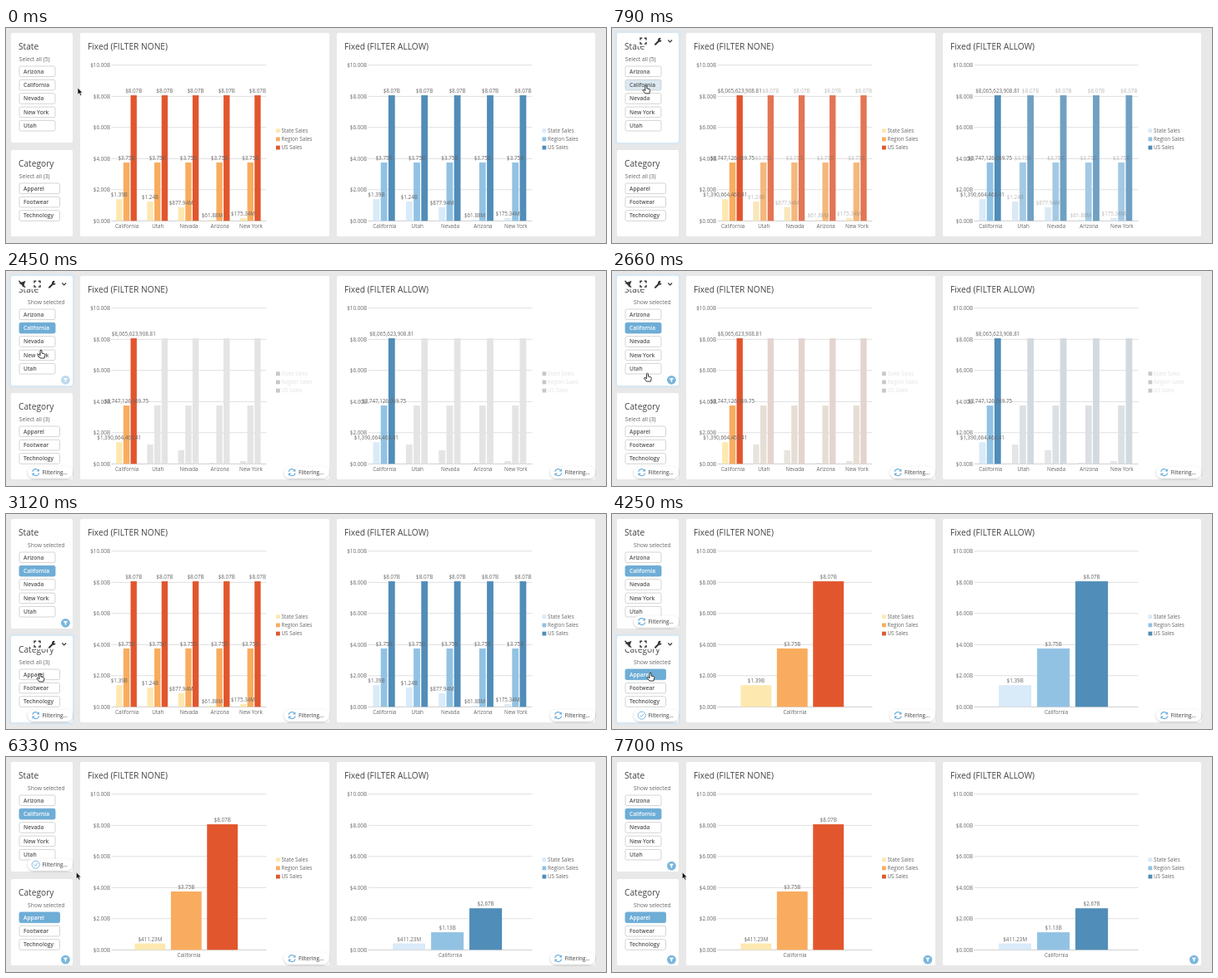
An HTML page for the animation above (8 s loop, 720x259 px).

```html
<!DOCTYPE html>
<html lang="en">
<head>
<meta charset="utf-8">
<title>Dashboard filters</title>
<style>
  html, body { margin: 0; width: 100%; height: 100%; overflow: hidden; background: #e8e8e8; }
  svg { display: block; width: 720px; height: 259px; font: 6.3px "Open Sans", "Noto Sans", sans-serif; fill: #666; }
  .title { font-size: 10.2px; fill: #444; }
  .link { font-size: 6.7px; }
  .button { font-size: 6.65px; font-weight: 600; fill: #555; }
  .pill { font-weight: 600; fill: #666; }
  .icon { fill: none; stroke: #333; stroke-width: 1.4; }
  .blue { fill: none; stroke: #6eb1dc; stroke-width: 1.2; }
</style>
</head>
<body>
<svg id="stage" viewBox="0 0 720 259" xmlns="http://www.w3.org/2000/svg">
  <defs>
    <filter id="shadow" x="-20%" y="-40%" width="140%" height="200%">
      <feDropShadow dx="0" dy="0.8" stdDeviation="1.1" flood-opacity="0.28"/>
    </filter>
  </defs>
  <g id="scene"></g>
</svg>
<script>
const LOOP = 8000;
const scene = document.getElementById('scene');

const clamp = v => Math.max(0, Math.min(1, v));
const mix = (a, b, p) => a + (b - a) * p;
const smooth = p => p * p * (3 - 2 * p);
const ramp = (t, from, to) => smooth(clamp((t - from) / (to - from)));
const between = (t, from, to) => t >= from && t < to;

// Eased position along [time, x, y] stops
function along(stops, t) {
  const i = stops.findIndex(s => s[0] > t);
  if (i < 0) return stops[stops.length - 1].slice(1);
  if (i === 0) return stops[0].slice(1);
  const a = stops[i - 1], b = stops[i], p = ramp(t, a[0], b[0]);
  return [mix(a[1], b[1], p), mix(a[2], b[2], p)];
}

function mixColor(a, b, p) {
  const part = (c, i) => parseInt(c.slice(1 + 2 * i, 3 + 2 * i), 16);
  return `rgb(${[0, 1, 2].map(i => Math.round(mix(part(a, i), part(b, i), p)))})`;
}

const rect = (x, y, w, h, fill, extra = '') =>
  `<rect x="${x}" y="${y}" width="${w}" height="${h}" fill="${fill}" ${extra}/>`;
const text = (x, y, s, extra = '') => `<text x="${x}" y="${y}" ${extra}>${s}</text>`;
const group = (inner, opacity) => opacity > 0 ? `<g opacity="${opacity}">${inner}</g>` : '';
const path = (d, extra) => `<path d="${d}" ${extra}/>`;

const STATES = ['California', 'Utah', 'Nevada', 'Arizona', 'New York'];
const STATE_SALES = [1.3907, 1.24, 0.87794, 0.06188, 0.17534];
const EXACT = ['$1,390,664,463.41', '$3,747,126,069.75', '$8,065,623,908.81'];
const SERIES = ['State Sales', 'Region Sales', 'US Sales'];
const BASE = 232.3, UNIT = 18.75;

const CHARTS = [
  { x: 89, width: 299, title: 'Fixed (FILTER NONE)', left: 126.6, right: 312.5, legend: 324,
    colors: ['#fde8b0', '#f9ac5f', '#e2562d'], final: [0.41123, 3.7471, 8.0656] },
  { x: 397, width: 310, title: 'Fixed (FILTER ALLOW)', left: 434.6, right: 631.6, legend: 643.5,
    colors: ['#d9eaf8', '#92c2e3', '#508db8'], final: [0.41123, 1.13, 2.67] }
];

const money = v => v < 1 ? `$${(v * 1000).toFixed(2)}M` : `$${v.toFixed(2)}B`;

function drawChart(c, t) {
  const focus = ramp(t, 560, 1330) * (1 - ramp(t, 2560, 3040));
  const faded = ramp(t, 910, 1330) * (1 - ramp(t, 2700, 3090));
  const widen = ramp(t, 3840, 4190);
  const settle = ramp(t, 5450, 5790);
  const exact = between(t, 640, 2800);
  const span = c.right - c.left;
  let bars = '', labels = '';

  let out = rect(c.x, 6, c.width, 245, '#fff', 'rx="2"') + text(c.x + 9, 26, c.title, 'class="title"');
  for (let v = 0; v <= 10; v += 2) {
    const y = BASE - v * UNIT;
    out += rect(c.left, y - 0.4, span, 0.8, v ? '#d8d8d8' : '#c4c4c4');
    labels += text(c.left - 1.6, y + 2.3, `$${v.toFixed(2)}B`, 'text-anchor="end"');
  }

  STATES.forEach((name, i) => {
    const main = i === 0;
    const shown = main ? 1 : 1 - widen;
    if (!shown) return;
    const slot = main ? mix(span / 5, span, widen) : span / 5;
    const center = c.left + (main ? slot / 2 : slot * (i + 0.5));
    const pitch = slot * 0.7 / 3;
    let groupBars = '', groupLabels = '';
    [STATE_SALES[i], 3.7471, 8.0656].forEach((start, k) => {
      const value = main ? mix(start, c.final[k], settle) : start;
      const x = center + pitch * (k - 1.5), w = pitch * 0.85, top = BASE - value * UNIT;
      const fill = main ? c.colors[k] : mixColor(c.colors[k], '#e4e4e4', focus);
      groupBars += rect(x, top, w, BASE - top, fill);
      const label = main && exact ? EXACT[k] : money(settle && main ? c.final[k] : start);
      groupLabels += group(text(x + w / 2, top - 3, label, 'text-anchor="middle"'),
        main ? 1 : 1 - clamp(focus * 2.5));
    });
    bars += group(groupBars, shown);
    labels += group(groupLabels + text(center, 241.2, name, 'text-anchor="middle"'), shown);
  });

  SERIES.forEach((name, k) => {
    const y = 123.7 + k * 10.2;
    labels += rect(c.legend, y - 2.4, 4.8, 4.8, mixColor(c.colors[k], '#c8c8c8', faded)) +
      text(c.legend + 6.5, y + 2.3, name, `fill="${mixColor('#666666', '#e2e2e2', faded)}"`);
  });
  return out + bars + labels;
}

function drawToolbar(cy, full) {
  const left = full ? 12 : 30;
  let out = rect(left, cy - 7.5, 78 - left, 13.5, '#fff');
  if (full) {
    out += path(`M15.5 ${cy - 1} L23.5 ${cy - 4} L20.5 ${cy + 4} L19 ${cy + 1} Z`, 'fill="#333"') +
      path(`M15.5 ${cy - 4} L23 ${cy + 4}`, 'class="icon"');
  }
  const corner = (sx, sy) =>
    path(`M${37.5 + 1.3 * sx} ${cy + 3.4 * sy} h${2.2 * sx} v${-2.2 * sy}`, 'class="icon"');
  out += corner(1, 1) + corner(1, -1) + corner(-1, 1) + corner(-1, -1);
  out += path(`M52 ${cy + 4} L56 ${cy}`, 'class="icon" style="stroke-width:2" stroke-linecap="round"');
  out += path(`M58.8 ${cy - 3.2} A2.3 2.3 0 1 0 59.6 ${cy - 0.8} L57.2 ${cy - 1.2} Z`, 'fill="#333"');
  return out + path(`M67.3 ${cy - 1.2} l2.4 2.4 l2.4 -2.4`, 'class="icon" style="stroke-width:1.1"');
}

function drawPanel(p, t) {
  const hovered = between(t, ...p.hover);
  const chosen = t >= p.click;
  let out = hovered ? rect(3.5, p.y - 2.5, 79, p.height + 5, '#d9e7f1', 'rx="3"') : '';
  out += rect(6, p.y, 74, p.height, '#fff', 'rx="2"') + text(15, p.y + 20, p.title, 'class="title"');
  out += chosen
    ? text(70.5, p.y + 34, 'Show selected', 'class="link" text-anchor="end"')
    : text(15.8, p.y + 34, `Select all (${p.items.length})`, 'class="link"');
  p.items.forEach((name, i) => {
    const y = p.y + 40 + i * 16.35;
    const on = name === p.pick && chosen;
    const warm = name === p.pick && between(t, p.warm, p.click);
    const fill = on ? '#6eadd6' : warm ? '#dbe8f1' : '#fff';
    out += rect(16, y, p.buttonWidth, 12.6, fill, `rx="1.8" stroke="${on ? '#6eadd6' : '#d0d0d0'}" stroke-width="0.9"`);
    out += text(21, y + 8.7, name, `class="button" ${on ? 'style="fill:#fff"' : ''}`);
  });
  return out + (hovered ? drawToolbar(p.y + 9.7, chosen) : '');
}

const PANELS = [
  { y: 6, height: 132, title: 'State', items: ['Arizona', 'California', 'Nevada', 'New York', 'Utah'],
    buttonWidth: 43, pick: 'California', hover: [260, 2830], warm: 560, click: 1910 },
  { y: 147, height: 104, title: 'Category', items: ['Apparel', 'Footwear', 'Technology'],
    buttonWidth: 48.5, pick: 'Apparel', hover: [2830, 4980], warm: 3700, click: 3740 }
];

function drawPill(x, y, done) {
  const cx = x + 9.7;
  let out = rect(x, y - 7.2, 54, 14.4, '#fff', 'rx="7.2" filter="url(#shadow)"');
  out += done
    ? `<circle cx="${cx}" cy="${y}" r="4.6" class="blue" style="stroke-width:.9"/>` +
      path(`M${cx - 2} ${y} l1.5 1.6 l2.7 -3.2`, 'class="blue" style="stroke-width:.9"')
    : path(`M${cx - 4} ${y - 0.8} A4 4 0 0 1 ${cx + 3} ${y - 2.6} M${cx + 4} ${y + 0.8} A4 4 0 0 1 ${cx - 3} ${y + 2.6}`, 'class="blue"') +
      path(`M${cx + 4.3} ${y - 4.4} v3.4 h-3.4 Z M${cx - 4.3} ${y + 4.4} v-3.4 h3.4 Z`, 'fill="#6eb1dc"');
  return out + text(x + 17.5, y + 2.3, 'Filtering...', 'class="pill"');
}

const drawFunnel = (x, y) => `<circle cx="${x}" cy="${y}" r="5.4" fill="#7ab6dd"/>` +
  path(`M${x - 2.8} ${y - 2.3} h5.6 l-2.1 2.5 v2.6 l-1.4 -.9 v-1.7 Z`, 'fill="#fff"');

// Each badge: pill shown, check mark, pill leaves for the funnel
const BADGES = [
  { x: 26, y: 129.6, show: 3880, check: 4700, leave: 6360, end: 6520 },
  { x: 26, y: 242.6, show: 2060, check: 4130, leave: 4600, end: 4760 },
  { x: 333.5, y: 242.6, show: 2060, check: 7000, leave: 7560, end: 7700 },
  { x: 653, y: 242.6, show: 2060, check: 6600, leave: 6820, end: 7000 }
];

function drawBadge(b, t) {
  const gone = ramp(t, b.leave, b.end);
  return group(drawFunnel(b.x + 45.4, b.y + 1.5), gone) +
    group(drawPill(b.x, b.y, t >= b.check), ramp(t, b.show, b.show + 160) * (1 - gone));
}

const POINTER = [
  [40, 86, 72], [700, 41, 69], [1000, 40.5, 68.3], [2280, 40.5, 68.3], [2450, 42, 95],
  [2700, 42.5, 125], [3120, 41, 192], [3480, 41, 192], [3500, 41.5, 194.2], [3700, 41.5, 194.2],
  [3950, 46, 191], [4580, 46, 191], [5080, 83, 138], [5200, 83, 138], [5370, 84.3, 138.8]
];

function drawPointer(t) {
  const [x, y] = along(POINTER, t);
  const hand = between(t, 560, 4720);
  const d = hand
    ? 'M-1 .8 Q0 -.4 1 .8 V4 L4.2 4.8 Q5 5.2 4.8 6.4 L4 10 H-1 L-4 6.2 Q-3.8 4.8 -2.4 5.6 L-1 6.8 Z'
    : 'M0 0 V8.2 L1.9 6.5 L3.3 9.4 L4.7 8.7 L3.4 6 H5.8 Z';
  const look = hand ? 'fill="#fff" stroke="#222" stroke-width=".9"' : 'fill="#111" stroke="#fff" stroke-width=".6"';
  return path(d, `transform="translate(${x} ${y})" ${look} stroke-linejoin="round"`);
}

function render(t) {
  scene.innerHTML =
    PANELS.map(p => drawPanel(p, t)).join('') +
    CHARTS.map(c => drawChart(c, t)).join('') +
    group(drawFunnel(71.4, 131.3), ramp(t, 2300, 2600) * (t < 3960)) +
    BADGES.map(b => drawBadge(b, t)).join('') +
    drawPointer(t);
}

const begin = performance.now();
function tick() {
  render((performance.now() - begin) % LOOP);
  requestAnimationFrame(tick);
}
tick();
</script>
</body>
</html>
```
